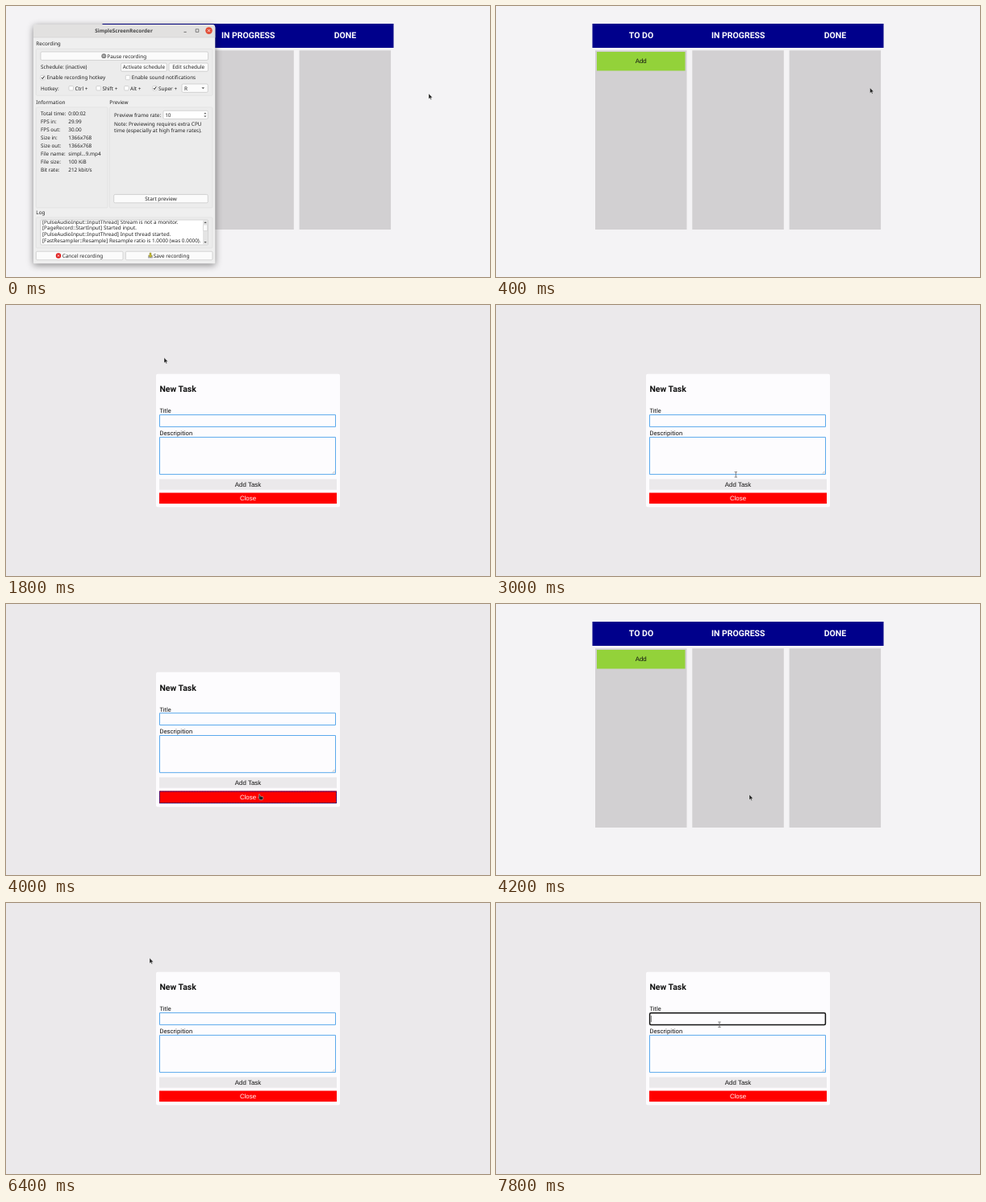
Recreate the animation shown at these times as an HTML page with a canvas. Size 600 by 337 pixels, loop 8 s.

```html
<!DOCTYPE html>
<html lang="en">
<head>
<meta charset="utf-8">
<title>Task board</title>
<style>
  html, body { margin: 0; width: 100%; height: 100%; overflow: hidden; background: #f4f3f5; }
  canvas { display: block; width: 600px; height: 337px; }
</style>
</head>
<body>
<canvas></canvas>
<script>
const LOOP = 8000, STEP = 200;
const ROBOTO = 'Roboto, sans-serif';
const ARIAL = '"Liberation Sans", sans-serif';
const UI = '"Noto Sans", sans-serif';
const NAVY = '#00008b';

const canvas = document.querySelector('canvas');
const ctx = canvas.getContext('2d');
const ratio = window.devicePixelRatio || 1;
canvas.width = 600 * ratio;
canvas.height = 337 * ratio;
ctx.scale(ratio, ratio);
ctx.textRendering = 'geometricPrecision';

// Pointer path: time, x, y
const path = [
  [0, 524, 109], [200, 524, 109], [1200, 222, 73], [1400, 196, 65.5], [2000, 196, 65.5],
  [2800, 285, 180], [3400, 322, 272], [4000, 314, 237], [4200, 314, 237],
  [5200, 212, 74], [5400, 178, 68.5], [6400, 178, 68.5], [7200, 282, 228], [7800, 277, 151]
];

function pointerAt(time) {
  const next = path.findIndex(p => p[0] > time);
  if (next < 0) return path[path.length - 1].slice(1);
  const [t0, x0, y0] = path[next - 1], [t1, x1, y1] = path[next];
  const k = (time - t0) / (t1 - t0);
  return [x0 + (x1 - x0) * k, y0 + (y1 - y0) * k];
}

function rect(x, y, w, h, fill, stroke, radius = 0, lineWidth = 1) {
  ctx.beginPath();
  ctx.roundRect(x, y, w, h, radius);
  if (fill) { ctx.fillStyle = fill; ctx.fill(); }
  if (stroke) { ctx.strokeStyle = stroke; ctx.lineWidth = lineWidth; ctx.stroke(); }
}

// y is the middle of the capital letters
function text(str, x, y, size, family, { color = '#111', weight = 400, align = 'left' } = {}) {
  ctx.font = `${weight} ${size}px ${family}`;
  ctx.textAlign = align;
  ctx.fillStyle = color;
  ctx.fillText(str, x, y + size * 0.36);
}

function line(points, color, width = 0.8) {
  ctx.beginPath();
  points.forEach(([x, y]) => ctx.lineTo(x, y));
  ctx.strokeStyle = color;
  ctx.lineWidth = width;
  ctx.stroke();
}

function polygon(points, fill, stroke, width = 0.6) {
  ctx.beginPath();
  points.forEach(([x, y]) => ctx.lineTo(x, y));
  ctx.closePath();
  ctx.fillStyle = fill;
  ctx.fill();
  if (stroke) { ctx.strokeStyle = stroke; ctx.lineWidth = width; ctx.stroke(); }
}

function disc(x, y, r, fill) {
  ctx.beginPath();
  ctx.arc(x, y, r, 0, 7);
  ctx.fillStyle = fill;
  ctx.fill();
}

function cross(x, y, r) {
  line([[x - r, y - r], [x + r, y + r]], '#fff');
  line([[x + r, y - r], [x - r, y + r]], '#fff');
}

function dashedBorder(x, y, w, h) {
  ctx.setLineDash([1.4, 0.6]);
  rect(x, y, w, h, null, NAVY);
  ctx.setLineDash([]);
}

function drawBoard(hoverAdd) {
  rect(0, 0, 600, 337, '#f4f3f5');
  rect(119.5, 22, 361, 30, NAVY);
  ['TO DO', 'IN PROGRESS', 'DONE'].forEach((name, i) => {
    text(name, 180 + 120.2 * i, 36.7, 10.5, ROBOTO, { color: '#fff', weight: 700, align: 'center' });
    rect(123 + 120.3 * i, 55.3, 113.5, 222.7, '#d2d0d2');
  });
  rect(125, 57, 109.5, hoverAdd ? 25 : 23.4, '#93d23a');
  if (hoverAdd) dashedBorder(124.8, 57.3, 109.8, 24.4);
  text('Add', 179.7, hoverAdd ? 69.4 : 68.6, 7.9, ARIAL, { align: 'center' });
}

function drawModal(hoverClose, titleFocused, caret) {
  const up = hoverClose ? 0.9 : 0;
  const blue = '#5ba9ec';
  rect(0, 0, 600, 337, '#ebe9eb');
  rect(186, 85.7 - up, 228, 165.6 + 2 * up, '#fdfcfe', null, 2);
  ctx.save();
  ctx.translate(0, -up);
  text('New Task', 190.4, 104.7, 10.5, ROBOTO, { weight: 700 });
  text('Title', 190.4, 131.8, 7.4, ROBOTO);
  text('Descripition', 190.4, 159.5, 7.7, ROBOTO);
  if (titleFocused) rect(190.6, 136.8, 217.8, 14.6, '#fdfcfe', '#111', 1.5, 1.5);
  else rect(190.5, 136.6, 218, 14.8, '#fdfcfe', blue);
  if (caret) line([[192.5, 140], [192.5, 148]], '#333', 0.6);
  rect(190.5, 164.4, 218, 46.2, '#fdfcfe', blue);
  line([[404.6, 209.6], [407.6, 206.6]], '#888', 0.5);
  line([[406.4, 209.6], [407.6, 208.4]], '#888', 0.5);
  rect(190, 216.5, 220, 13.2, '#ebe9eb');
  text('Add Task', 300, 223, 7.9, ARIAL, { align: 'center' });
  ctx.restore();
  rect(190, 233.5 - up, 220, 13.6 + 2 * up, '#f00');
  if (hoverClose) dashedBorder(190.5, 233.1, 219, 14.4);
  text('Close', 300, 240.2, 7.9, ARIAL, { color: '#fff', align: 'center' });
}

const label = (str, x, y, options) => text(str, x, y, 6.4, UI, { color: '#222', ...options });

function button(str, x, y, w, h, textX = x + w / 2) {
  rect(x, y, w, h, '#fbfbfb', '#c4c4c4', 1.5, 0.7);
  label(str, textX, y + h / 2, { align: 'center' });
}

function checkbox(str, x, y, checked) {
  rect(x, y - 2.7, 5.4, 5.4, '#fff', '#bbb', 1, 0.6);
  if (checked) line([[x + 1.2, y], [x + 2.4, y + 1.5], [x + 4.4, y - 1.7]], '#222', 1);
  label(str, x + 7.4, y);
}

function group(title, x, y, w, h) {
  label(title, x, y - 6.3);
  rect(x, y, w, h, '#ececec', '#dcdcdc', 1.5, 0.6);
}

function drawRecorder() {
  ctx.save();
  ctx.shadowColor = 'rgba(0,0,0,.45)';
  ctx.shadowBlur = 9 * ratio;
  ctx.shadowOffsetY = 2 * ratio;
  rect(34, 23, 225.3, 297.3, '#efefef', null, [4, 4, 1, 1]);
  ctx.restore();
  rect(34, 23, 225.3, 16, '#e2e1e0', null, [4, 4, 0, 0]);
  line([[34, 39], [259.3, 39]], '#cfcecd', 0.6);
  text('SimpleScreenRecorder', 146, 30.6, 6.4, UI, { color: '#444', weight: 700, align: 'center' });
  line([[220.5, 32.4], [223.7, 32.4]], '#555');
  rect(235.2, 28.8, 3.6, 3.6, null, '#555', 0, 0.7);
  disc(251.5, 30.6, 4.3, '#e2503a');
  cross(251.5, 30.6, 1.5);

  group('Recording', 37.3, 53.3, 218.7, 58);
  button('Pause recording', 43, 57, 207.5, 10.4, 149.7);
  disc(121.3, 62.2, 2.9, '#777');
  line([[120.4, 60.7], [120.4, 63.7]], '#fff', 0.7);
  line([[122.2, 60.7], [122.2, 63.7]], '#fff', 0.7);
  label('Schedule: (inactive)', 43, 76);
  button('Activate schedule', 142.5, 71, 56.8, 10.3);
  button('Edit schedule', 202, 71, 48.5, 10.3);
  checkbox('Enable recording hotkey', 43, 89, true);
  checkbox('Enable sound notifications', 148.3, 89);
  label('Hotkey:', 43, 102.2);
  checkbox('Ctrl +', 78, 102.2);
  checkbox('Shift +', 112, 102.2);
  checkbox('Alt +', 146.7, 102.2);
  checkbox('Super +', 181.7, 102.2, true);
  rect(218, 97, 32.3, 10.4, '#fbfbfb', '#c4c4c4', 1.5, 0.7);
  label('R', 221, 102.2);
  polygon([[242.5, 101.2], [246, 101.2], [244.25, 103.2]], '#555');

  group('Information', 37.3, 126, 88.7, 125);
  [['Total time:', '0:00:02'], ['FPS in:', '29.99'], ['FPS out:', '30.00'],
   ['Size in:', '1366x768'], ['Size out:', '1366x768'], ['File name:', 'simpl...9.mp4'],
   ['File size:', '100 KiB'], ['Bit rate:', '212 kbit/s']].forEach(([name, value], i) => {
    label(name, 43, 133.2 + 10.1 * i);
    label(value, 77.3, 133.2 + 10.1 * i);
  });

  group('Preview', 128.3, 126, 127.7, 125);
  label('Preview frame rate:', 134, 135.3);
  rect(195, 130.2, 55.3, 10.2, '#fff', '#c4c4c4', 1.5, 0.7);
  label('10', 197.2, 135.3);
  polygon([[245.3, 134.2], [248.5, 134.2], [246.9, 132.4]], '#555');
  polygon([[245.3, 136.4], [248.5, 136.4], [246.9, 138.2]], '#555');
  label('Note: Previewing requires extra CPU', 134, 147);
  label('time (especially at high frame rates).', 134, 154.8);
  button('Start preview', 133.7, 234.4, 116.6, 10.4);

  group('Log', 37.3, 263, 218.7, 38);
  rect(43, 266, 207.5, 31, '#fff', '#c4c4c4', 1, 0.7);
  ctx.save();
  ctx.beginPath();
  ctx.rect(43, 266.4, 207, 30.2);
  ctx.clip();
  ['[PulseAudioInput::InputThread] Stream is not a monitor.',
   '[PageRecord::StartInput] Started input.',
   '[PulseAudioInput::InputThread] Input thread started.',
   '[FastResampler::Resample] Resample ratio is 1.0000 (was 0.0000).'
  ].forEach((entry, i) => label(entry, 45, 268.4 + 7.7 * i));
  ctx.restore();
  rect(244, 266.4, 6.1, 30.2, '#e4e4e4');
  rect(244.4, 272, 5.3, 7.6, '#fafafa', '#c4c4c4', 0.5, 0.5);
  polygon([[245.4, 270], [248.8, 270], [247.1, 268.2]], '#555');
  polygon([[245.4, 293], [248.8, 293], [247.1, 294.8]], '#555');

  button('Cancel recording', 37.3, 305.2, 107.7, 10.6, 95);
  disc(65, 310.5, 3.2, '#e01b1b');
  cross(65, 310.5, 1.3);
  button('Save recording', 148.3, 305.2, 107.7, 10.6, 205);
  rect(176, 311, 6, 2.6, '#aaa', null, 0.5);
  polygon([[178, 307], [180, 307], [180, 310], [181.6, 310], [179, 312.8], [176.4, 310], [178, 310]], '#c9bd35', '#77702a', 0.4);
}

function drawPointer(shape, x, y) {
  ctx.save();
  ctx.translate(x, y);
  if (shape === 'arrow') {
    polygon([[0, 0], [0, 6.6], [1.5, 5.3], [2.6, 7.5], [3.6, 7], [2.6, 4.9], [4.6, 4.7]], '#222', '#fff', 0.35);
  } else if (shape === 'hand') {
    polygon([[-0.6, -0.4], [0.7, -0.4], [1.1, 2.1], [4.6, 2.7], [4.9, 4.6], [4, 6.6], [0.6, 6.6], [-1.4, 3.4], [-0.2, 3.4]], '#222', '#eee', 0.4);
  } else {
    line([[0, -2.8], [0, 3.2]], '#666');
    line([[-1.7, -3], [1.7, -3]], '#666');
    line([[-1.7, 3.4], [1.7, 3.4]], '#666');
  }
  ctx.restore();
}

function draw(time) {
  const [x, y] = pointerAt(time);
  const over = (left, top, right, bottom) => x >= left && x <= right && y >= top && y <= bottom;
  const modalOpen = (time >= 1800 && time < 4200) || time >= 6400;
  let shape = 'arrow';
  if (modalOpen) {
    const onClose = over(190, 233, 410, 248);
    const focused = time >= 7600;
    drawModal(onClose, focused, focused);
    if (onClose || over(190, 216, 410, 230)) shape = 'hand';
    else if (over(190, 136, 409, 152) || over(190, 164, 409, 211)) shape = 'beam';
  } else {
    const onAdd = over(125, 57, 235, 82);
    drawBoard(onAdd);
    if (onAdd) shape = 'hand';
    if (time < 200) drawRecorder();
  }
  drawPointer(shape, x, y);
}

function tick() {
  const time = performance.now() % LOOP;
  draw(Math.floor(time / STEP) * STEP);
  requestAnimationFrame(tick);
}
tick();
</script>
</body>
</html>
```
